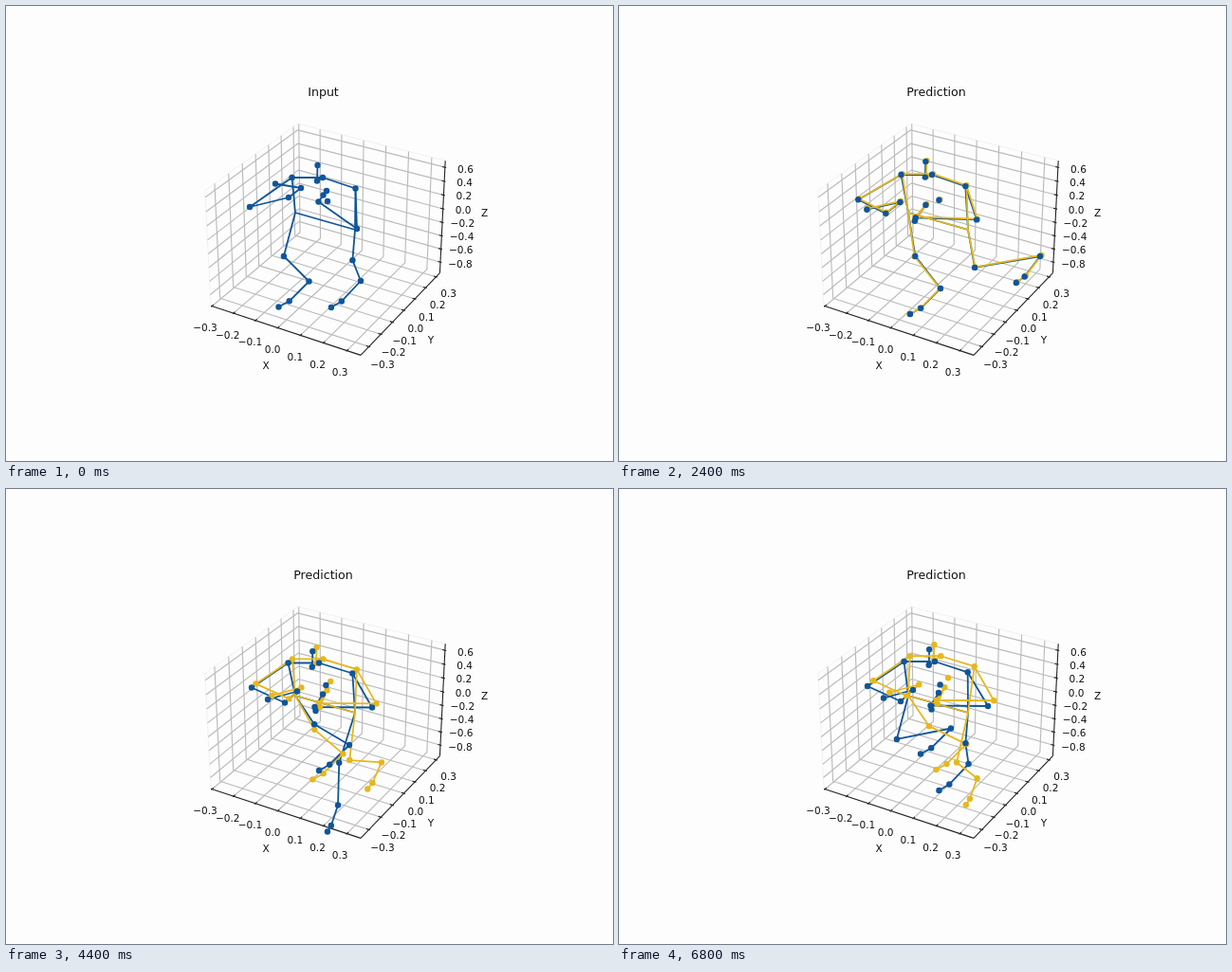
Write an HTML page with a canvas that moves like this. It is 640 px wide and 480 px high and loops after 7 s.

```html
<!DOCTYPE html>
<html lang="en">
<head>
<meta charset="utf-8">
<title>Walking pose</title>
<style>
  html, body { margin: 0; width: 100%; height: 100%; overflow: hidden; background: #fdfdfd; }
  canvas { display: block; }
</style>
</head>
<body>
<canvas id="stage" width="640" height="480"></canvas>
<script>
const ctx = document.getElementById('stage').getContext('2d');
const LOOP = 7000, STEP = 200, PREDICT_AT = 2000, STRIDE = 6800;
const BLUE = '#10559a', YELLOW = '#e7b81c', PAPER = '#fdfdfd';

const clamp = x => Math.max(0, Math.min(1, x));
const smooth = x => clamp(x) ** 2 * (3 - 2 * clamp(x));
const shift = (p, d, k = 1) => [p[0] + d[0] * k, p[1] + d[1] * k];

// One wave per stride, highest at the given time.
const wave = (t, mean, swing, peak) => mean + swing * Math.cos(2 * Math.PI * (t - peak) / STRIDE);

// Smooth curve through points at the key moments of the walk.
const MOMENTS = [0, 1600, 2400, 3600, 4400, 5400, 6800];
function path(...points) {
  const last = points.length - 1;
  const slope = (i, n) => {
    const a = Math.max(0, i - 1), b = Math.min(last, i + 1);
    return (points[b][n] - points[a][n]) / (MOMENTS[b] - MOMENTS[a]);
  };
  return t => {
    let i = 0;
    while (i < last - 1 && t > MOMENTS[i + 1]) i++;
    const span = MOMENTS[i + 1] - MOMENTS[i];
    const s = clamp((t - MOMENTS[i]) / span), r = 1 - s;
    return [0, 1].map(n =>
      r * r * (1 + 2 * s) * points[i][n] + s * s * (1 + 2 * r) * points[i + 1][n] +
      s * r * span * (r * slope(i, n) - s * slope(i + 1, n)));
  };
}

const bodySway = path([0, 0], [6, -4], [-4, -3], [-4.5, 3], [-4, 2.5], [5, 0.5], [-1, 1]);
const rightAnkle = path([319.5, 290.5], [299, 313], [339, 298], [352, 281], [362, 270], [360, 247.5], [350, 252.5]);
const leftAnkle = path([374, 290], [424, 274], [444, 264], [382, 298.5], [350, 333.5], [342, 320.5], [368.5, 290]);
const RIGHT_HIP = [305, 218], LEFT_HIP = [368, 236];

function foot(ankle, dx, dy) {
  return [ankle, shift(ankle, [0.65 * dx, 0.77 * dy]), shift(ankle, [dx, dy])];
}

function poseAt(t, lift = [0, 0]) {
  const sway = bodySway(t);
  const settle = smooth(t / 2800);
  const dip = Math.sin(Math.PI * clamp(t / 3200));
  const body = (point, gain = 1) => shift(shift(point, sway, gain), lift);
  const arm = (point, drop, pull) => shift(shift(body(point), drop, settle), [-pull, 0], dip);
  const hand = (wrist, thumb, tip) =>
    [arm(wrist, [0, 21], 18), arm(thumb, [0, 19], 15), arm(tip, [-4, 32], 21)];
  return {
    head: [body([328.5, 168], 1.3), body([328, 184.5], 1.3)],
    neck: body([334, 181]),
    spine: body([339, 206], 0.4),
    right: {
      shoulder: body([301.5, 181]),
      arm: [arm([257, 212], [6, -5], 9), ...hand([298, 202], [311, 192], [284, 187.5])],
      hip: RIGHT_HIP,
      leg: [[wave(t, 309, -18, 500), wave(t, 259, 11, 1200)],
        ...foot(shift(rightAnkle(t), lift), -32, 27)]
    },
    left: {
      shoulder: body([368.5, 192.5], 0.8),
      arm: [arm([370, 235], [20, -7], 11), ...hand([329.5, 206.5], [338, 195], [334.5, 199.5])],
      hip: LEFT_HIP,
      leg: [[wave(t, 364, 15, 1600), wave(t, 277, -12, 800)],
        ...foot(shift(leftAnkle(t), lift), wave(t, -23, -12, 900), 28)]
    }
  };
}

// The prediction lags more and more behind the walk and drifts up and right.
function forecastAt(t) {
  const elapsed = t - PREDICT_AT;
  const lagged = PREDICT_AT + 2150 * (1 - Math.exp(-elapsed / 2200));
  const drift = elapsed / 4800;
  return poseAt(lagged, [10 * drift, -8 * drift]);
}

// Perspective view of the box: elevation 30, azimuth -60, inputs from 0 to 1.
const ZOOM = 158.3, DISTANCE = 9, CENTER = { x: 339.1, y: 240.1 };
function project([fx, fy, fz]) {
  const x = (fx - 0.5) * 1.143, y = (fy - 0.5) * 1.143, z = (fz - 0.5) * 0.875;
  const right = 0.866 * x + 0.5 * y;
  const up = -0.25 * x + 0.433 * y + 0.866 * z;
  const near = 0.433 * x - 0.75 * y + 0.5 * z;
  const k = ZOOM * DISTANCE / (DISTANCE - near);
  return [CENTER.x + right * k, CENTER.y - up * k];
}

function polyline(points, color, width) {
  ctx.strokeStyle = color;
  ctx.lineWidth = width;
  ctx.beginPath();
  points.forEach(p => ctx.lineTo(...p));
  ctx.stroke();
}
const line3d = (points, color, width) => polyline(points.map(project), color, width);

function label(text, x, y, size = 10.5) {
  ctx.font = `${size}px "DejaVu Sans", sans-serif`;
  ctx.fillStyle = '#111';
  ctx.fillText(text, x, y + size * 0.36);
}

const TICK_IN = 1 / 60, TICK_OUT = 1 / 120;
const AXES = [
  { name: 'X', at: [274, 379], min: -0.305, max: 0.358, from: -0.3, step: 0.1, count: 7,
    text: i => [210 + 23.7 * i, 339 + 7.85 * i],
    grid: f => [[f, 0, 0], [f, 1, 0], [f, 1, 1]],
    tick: f => [[f, -TICK_OUT, 0], [f, TICK_IN, 0]], edge: [[0, 0, 0], [1, 0, 0]] },
  { name: 'Y', at: [448, 352.5], min: -0.367, max: 0.336, from: -0.3, step: 0.1, count: 7,
    text: i => [397 + 11.6 * i, 378 - 12.5 * i],
    grid: f => [[1, f, 0], [0, f, 0], [0, f, 1]],
    tick: f => [[1 + TICK_OUT, f, 0], [1 - TICK_IN, f, 0]], edge: [[1, 0, 0], [1, 1, 0]] },
  { name: 'Z', at: [504.5, 218], min: -0.968, max: 0.692, from: -0.8, step: 0.2, count: 8,
    text: i => [479 + 0.78 * i, 272 - 14.3 * i],
    grid: f => [[0, 0, f], [0, 1, f], [1, 1, f]],
    tick: f => [[1 + TICK_OUT, 1, f], [1 - TICK_IN, 1, f]], edge: [[1, 1, 0], [1, 1, 1]] }
];

function drawAxes() {
  line3d([[0, 0, 0], [0, 0, 1], [0, 1, 1], [1, 1, 1]], '#f2f2f2', 1);
  const eachTick = (axis, draw) => {
    for (let i = 0; i < axis.count; i++) {
      const value = axis.from + i * axis.step;
      draw((value - axis.min) / (axis.max - axis.min), value, i);
    }
  };
  for (const axis of AXES) eachTick(axis, f => line3d(axis.grid(f), '#bbb', 1.15));
  for (const axis of AXES) {
    line3d(axis.edge, '#222', 1.1);
    eachTick(axis, (f, value, i) => {
      line3d(axis.tick(f), '#222', 1.1);
      const sign = value < -0.01 ? '\u2212' : '';
      label(sign + Math.abs(value).toFixed(1), ...axis.text(i));
    });
    label(axis.name, ...axis.at);
  }
}

function drawBones({ head, neck, right, left }, color) {
  const bone = (...points) => polyline(points, color, 1.8);
  bone(...head, neck);
  bone(right.shoulder, neck, left.shoulder);
  bone(right.hip, left.hip);
  for (const side of [right, left]) {
    bone(side.shoulder, ...side.arm);
    bone(side.shoulder, side.hip, ...side.leg);
  }
}

function drawJoints({ head, neck, spine, right, left }, color) {
  ctx.fillStyle = color;
  const limbs = [right, left].flatMap(side => [side.shoulder, ...side.arm, ...side.leg]);
  for (const [x, y] of [...head, neck, spine, ...limbs]) {
    ctx.beginPath();
    ctx.arc(x, y, 3.2, 0, 2 * Math.PI);
    ctx.fill();
  }
}

function frame() {
  const time = Math.floor(performance.now() % LOOP / STEP) * STEP;
  const predicting = time >= PREDICT_AT;
  ctx.fillStyle = PAPER;
  ctx.fillRect(0, 0, 640, 480);
  ctx.textAlign = 'center';
  ctx.lineJoin = 'round';
  drawAxes();
  label(predicting ? 'Prediction' : 'Input', 334.5, 90.3, 12.6);
  const layers = [[poseAt(time), BLUE]];
  if (predicting) layers.push([forecastAt(time), YELLOW]);
  for (const layer of layers) drawBones(...layer);
  for (const layer of layers.reverse()) drawJoints(...layer);
  requestAnimationFrame(frame);
}
frame();
</script>
</body>
</html>
```
